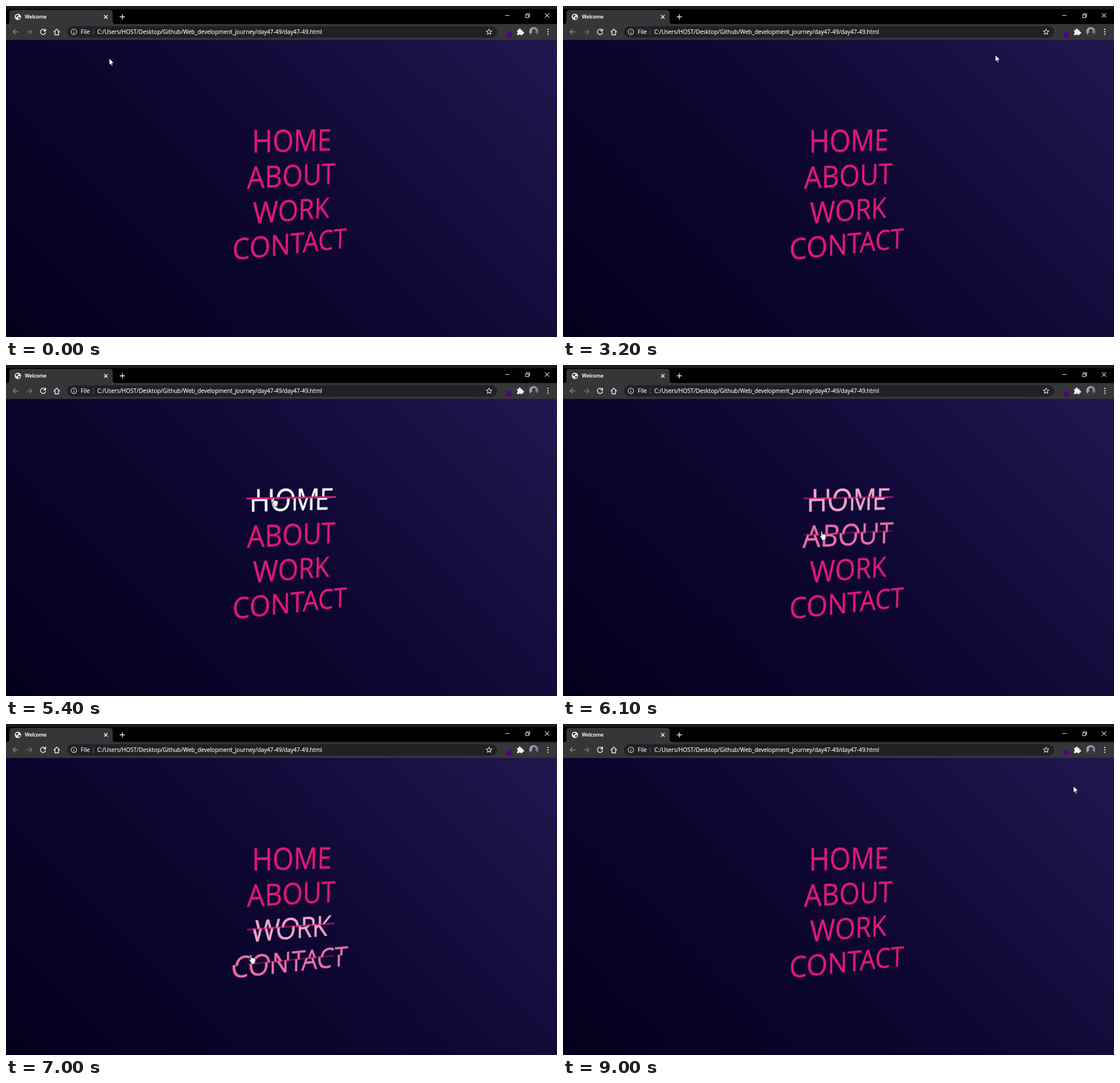
An HTML page for the animation above (9100 ms loop, 966 by 580 pixels).

```html
<!DOCTYPE html>
<html lang="en">
<head>
<meta charset="utf-8">
<title>Welcome</title>
<style>
html, body { margin: 0; width: 100%; height: 100%; overflow: hidden; background: #000; }
#stage { position: relative; width: 966px; height: 580px; overflow: hidden; font-family: "Open Sans", "Noto Sans", sans-serif; }
#page { position: absolute; top: 59px; width: 966px; height: 521px; background: linear-gradient(45deg, #02001c, #0e0733 52%, #20174f); }
svg { position: absolute; left: 0; top: 0; }
/* The menu is one plane seen in perspective, its origin at the middle of the first word. */
#menu { position: absolute; left: 503px; top: 237px; transform-origin: 0 0;
  transform: matrix3d(.885, -.018, 0, .0004, -.008, 1, 0, .0002, 0, 0, 1, 0, 0, 0, 0, 1); }
.word { position: absolute; left: -150px; width: 300px; height: 60px; }
.word span { position: absolute; inset: 0; text-align: center; font-size: 53px; line-height: 60px; -webkit-text-stroke: .4px; }
.word .top { clip-path: inset(-9px 0 31px 0); }
.word .low { clip-path: inset(27px 0 -9px 0); }
.word i { position: absolute; left: 61px; top: 26px; width: 178px; height: 3px; background: #e21875; }
</style>
</head>
<body>
<div id="stage">
  <div id="page"></div>
  <div id="menu"></div>
  <svg width="966" height="580" fill="none" stroke-linecap="round" stroke-linejoin="round">
    <defs>
      <linearGradient id="face" x2="1" y2="1">
        <stop stop-color="#b9b5bd"/><stop offset="1" stop-color="#665d70"/>
      </linearGradient>
    </defs>
    <path fill="#000" d="M0 0h966v32H0z"/>
    <path fill="#1b1b1b" d="M0 0h966v5.5H0z"/>
    <path fill="#353638" d="M0 31.5H2Q6 31.5 6 27V12Q6 7 11 7H182Q187 7 187 12V27Q187 31.5 192 31.5H966V59.5H0z"/>
    <rect x="107" y="35.5" width="754" height="20" rx="10" fill="#202124"/>

    <circle cx="20.8" cy="19" r="5.5" fill="#f1f1f1"/>
    <path fill="#353638" d="M17 17l3-2 2 1-1 2-2 1-1 2zM21 20l3-1 1 2-3 2.5z"/>

    <g fill="#fff" stroke="#fff" stroke-width=".15">
      <text x="33" y="22" font-size="8.6" font-weight="600">Welcome</text>
      <text x="131" y="49" font-size="10">File</text>
      <text x="160" y="49" font-size="10">C:/Users/HOST/Desktop/Github/Web_development_journey/day47-49/day47-49.html</text>
    </g>

    <g stroke="#eee" stroke-width="1.4">
      <path d="M172.3 16.3l5.4 5.4m0-5.4l-5.4 5.4M204 15v8m-4-4h8"/>
      <path d="M68.6 42.5a4.6 4.6 0 1 0 .8 4M69.4 40.5v3.2h-3.2"/>
      <path d="M84 45.5l5-5 5 5M85.8 44.5v6h6.4v-6"/>
    </g>
    <g stroke="#ddd" stroke-width="1.1">
      <path d="M875.5 16.5h7M911 15.5h5.5v5h-5.5zM912.5 15v-1.5h5.5v5h-1.5M945 13.2l7 7m0-7l-7 7"/>
      <circle cx="119" cy="45.3" r="4.8"/>
      <path d="M119 45.2v2.4M119 42.9v.1"/>
      <path d="M847 40.4l1.4 3.2 3.5.3-2.7 2.3.8 3.5-3-1.9-3 1.9.8-3.5-2.7-2.3 3.5-.3z"/>
    </g>
    <path stroke="#8d8e90" stroke-width="1.3" d="M21.5 45.3h-9m4-4l-4 4 4 4"/>
    <path stroke="#77787a" stroke-width="1.3" d="M36.5 45.3h9m-4-4l4 4-4 4"/>
    <path stroke="#5c5d60" d="M153 40v11"/>
    <rect x="877.5" y="45.5" width="9.5" height="9.5" fill="#4b0a78"/>
    <path fill="#f1f1f1" d="M896 42.2h2.8a2 2 0 1 1 3.8 0h2.9v2.9a2 2 0 1 1 0 3.7v2.2h-3.2a1.7 1.7 0 0 0-3.2 0H896v-3a1.7 1.7 0 0 0 0-3.2z"/>
    <circle cx="925.3" cy="45" r="8" fill="url(#face)"/>
    <path fill="#393346" d="M919.5 50.5q1-4 4-4.3a3.2 3.2 0 1 1 4 0q3 .5 3.7 4.2a8 8 0 0 1-11.7.1z"/>
    <path fill="#eee" d="M949 40h2v2h-2zm0 4.3h2v2h-2zm0 4.3h2v2h-2z"/>

    <g id="pointer" stroke="#0b0820" stroke-width=".7">
      <path id="arrow" fill="#fff" d="M0 0V11.3L2.6 9 4.4 13.2 6.2 12.4 4.5 8.3H8z"/>
      <path id="hand" fill="#fff" d="M-1 1Q0-.6 1.2 1V6L2.4 5.2 4 6 5.5 5.7 6.6 6.6 7.8 7V11L6.6 13.4V16H0V13.6L-3.4 9Q-3.5 7.3-1 9z"/>
    </g>
  </svg>
</div>
<script>
const LOOP = 9100, STEP = 100, FADE = 400;
const PINK = [226, 24, 117], WHITE = [255, 252, 255];
const $ = id => document.getElementById(id);
const clamp = x => Math.max(0, Math.min(1, x));

// name, time the pointer enters, time it leaves
const words = [
  ["HOME", 4700, 5950],
  ["ABOUT", 5950, 6250],
  ["WORK", 6250, 6850],
  ["CONTACT", 6850, 7450]
].map(([name, enter, leave], i) => {
  const box = document.createElement("div");
  box.className = "word";
  box.style.top = i * 62.1 - 31.65 + "px";
  box.innerHTML = `<span class="top">${name}</span><span class="low">${name}</span><i></i>`;
  $("menu").append(box);
  const [top, low, line] = box.children;
  return { enter, leave, box, top, low, line };
});

// time, x, y of the pointer tip
const path = [
  [0, 181, 92], [700, 400, 84], [1800, 710, 70], [2600, 752, 82],
  [3200, 758, 86], [4000, 760, 88], [4700, 545, 228], [5400, 469, 232],
  [5800, 462, 250], [6700, 436, 373], [7150, 426, 420], [7600, 415, 464],
  [7800, 373, 488], [8000, 400, 468], [8400, 645, 382], [9000, 895, 109]
];

function pointerAt(t) {
  const i = Math.max(1, path.findIndex(p => p[0] >= t));
  const [t0, x0, y0] = path[i - 1], [t1, x1, y1] = path[i];
  const k = (t - t0) / (t1 - t0);
  return [x0 + (x1 - x0) * k, y0 + (y1 - y0) * k];
}

function draw(t) {
  let over = false;
  for (const w of words) {
    over ||= t >= w.enter && t < w.leave;
    const k = clamp(clamp((t - w.enter) / FADE) - clamp((t - w.leave) / FADE));
    const shift = 5 * Math.min(1, k * 1.4);
    w.box.style.color = `rgb(${PINK.map((c, i) => Math.round(c + (WHITE[i] - c) * k))})`;
    w.top.style.transform = `translateX(${shift}px)`;
    w.low.style.transform = `translateX(${-shift}px)`;
    w.line.style.opacity = k;
  }
  $("pointer").setAttribute("transform", `translate(${pointerAt(t)})`);
  $("arrow").style.display = over ? "none" : "";
  $("hand").style.display = over ? "" : "none";
}

const start = performance.now();
function tick() {
  const t = (performance.now() - start) % LOOP;
  draw(Math.floor(t / STEP) * STEP);
  requestAnimationFrame(tick);
}
tick();
</script>
</body>
</html>
```
